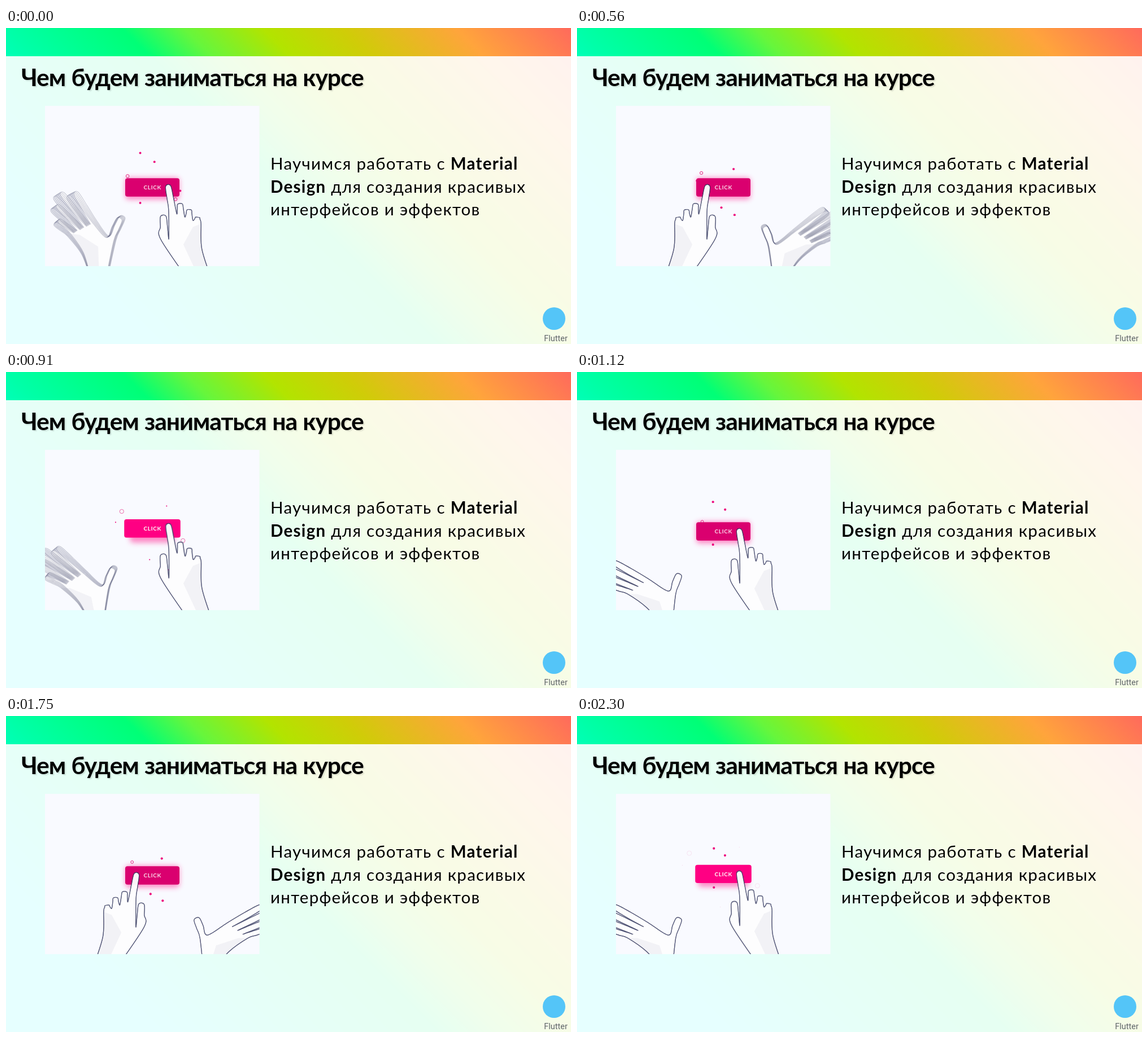
Animation, 1000 px wide and 560 px high, one loop 2370 ms. Source, as an HTML page:

```html
<!DOCTYPE html>
<html lang="ru">
<head>
<meta charset="utf-8">
<title>Чем будем заниматься на курсе</title>
<style>
  html, body { margin: 0; width: 100%; height: 100%; overflow: hidden; }
  svg { display: block; width: 100vw; height: 100vh; }
  text { font-family: Lato, "Open Sans", sans-serif; }
  .title { font-size: 42.5px; font-weight: 700; letter-spacing: -1px; word-spacing: 1px; text-shadow: 2px 2px 2px rgba(0,0,0,.12); }
  .body { font-size: 29.5px; letter-spacing: 1.3px; }
  .body tspan { font-weight: 700; }
  .label { font-size: 10px; font-weight: 700; letter-spacing: .7px; }
  .caption { font: 14.5px Roboto, Inter, sans-serif; fill: #606469; }
</style>
</head>
<body>
<svg viewBox="0 0 1000 560" preserveAspectRatio="none">
  <defs>
    <linearGradient id="rainbow" gradientUnits="userSpaceOnUse" x1="-280" y1="280" x2="500" y2="-500">
      <stop offset=".17" stop-color="#00ffff"/>
      <stop offset=".36" stop-color="#00ffa8"/>
      <stop offset=".49" stop-color="#00ff76"/>
      <stop offset=".56" stop-color="#66f63c"/>
      <stop offset=".65" stop-color="#b2e400"/>
      <stop offset=".74" stop-color="#d0cc08"/>
      <stop offset=".87" stop-color="#ffa43c"/>
      <stop offset="1" stop-color="#ff6a5c"/>
    </linearGradient>
    <clipPath id="panel"><rect x="69" y="138" width="379.5" height="284"/></clipPath>
    <filter id="soft" x="-30%" y="-80%" width="160%" height="260%"><feGaussianBlur stdDeviation="5"/></filter>
  </defs>
  <rect width="1000" height="560" fill="url(#rainbow)"/>
  <rect y="50" width="1000" height="510" fill="#fff" opacity=".9"/>
  <text class="title" x="27" y="103">Чем будем заниматься на курсе</text>
  <g class="body">
    <text x="468" y="250.5">Научимся работать с <tspan>Material</tspan></text>
    <text x="468" y="291.5"><tspan>Design</tspan> для создания красивых</text>
    <text x="468" y="332">интерфейсов и эффектов</text>
  </g>
  <circle cx="970" cy="515" r="20" fill="#54c5f8"/>
  <text class="caption" x="973" y="555" text-anchor="middle">Flutter</text>
  <g clip-path="url(#panel)">
    <rect x="69" y="138" width="380" height="284" fill="#f9faff"/>
    <rect id="shadow" rx="6" fill="#ff2f96" opacity=".55" filter="url(#soft)"/>
    <g id="sparks"></g>
    <rect id="button" rx="4"/>
    <text id="label" class="label" x="259.3" text-anchor="middle">CLICK</text>
    <g id="hands"></g>
  </g>
</svg>
<script>
const LOOP = 2370, STEP = 70, CYCLE = 18, HALF = CYCLE / 2, AXIS = 259, TRAIL = 6;
const $ = id => document.getElementById(id);
const mix = (a, b, k) => a + (b - a) * k;
const between = (p, q, k) => p.map((v, c) => mix(v, q[c], k));
const ease = (from, to, x) => {
  const k = Math.min(1, Math.max(0, (x - from) / (to - from)));
  return k * k * (3 - 2 * k);
};
const set = (el, attrs) => {
  for (const name in attrs) el.setAttribute(name, attrs[name]);
  return el;
};
const add = (parent, tag, attrs) =>
  parent.appendChild(set(document.createElementNS("http://www.w3.org/2000/svg", tag), attrs));

// Right-hand poses: wrist edges, thumb and knuckle line as points; fan in degrees from upright.
const OPEN = { wrist: [313, 357], thumb: [295, 366], thumbTip: [269, 320],
  first: [314, 332], last: [357, 345], fan: [-2, 28], reach: [70], fold: [1] };
const AWAY = { wrist: [349, 370], thumb: [350, 391], thumbTip: [336, 356],
  first: [396, 370], last: [424, 390], fan: [60, 72], reach: [78], fold: [1] };
const POINT = { wrist: [322, 364], thumb: [281, 374], thumbTip: [278, 330],
  first: [295, 326], last: [338, 344], fan: [-10, 8], reach: [58], fold: [.4] };
const FINGERS = [.86, 1, .8, .48];

function poseAt(step) {
  const s = (step + CYCLE) % CYCLE;
  const point = 1 - ease(2, 4, s) + ease(13, 15, s);
  const away = ease(3, 7, s) - ease(9, 13.2, s);
  const arc = away * (1 - away);
  const hover = ease(13, 15, s) - ease(15, 18, s);
  const pose = { shift: [20 * arc, -30 * arc - 9 * hover] };
  for (const part in OPEN) {
    pose[part] = OPEN[part].map((v, n) =>
      v + (POINT[part][n] - v) * point + (AWAY[part][n] - v) * away);
  }
  return pose;
}

function digit(base, tip, width) {
  const dx = tip[0] - base[0], dy = tip[1] - base[1], length = Math.hypot(dx, dy);
  const at = (side, far) => [
    base[0] + (dx * far - dy * side * width) / length,
    base[1] + (dy * far + dx * side * width) / length
  ];
  const end = length - width * .3;
  return [at(-.6, 0), at(-.52, length / 2), at(-.4, end), at(.4, end), at(.52, length / 2), at(.6, 0)];
}

function outline(step) {
  const { wrist, thumb, thumbTip, first, last, fan, reach, fold, shift } = poseAt(step);
  const knuckle = n => between(first, last, n / 3);
  const pts = [[wrist[0], 446], ...digit(thumb, thumbTip, 12), knuckle(-.5)];
  FINGERS.forEach((size, n) => {
    const angle = mix(fan[0], fan[1], n / 3) * Math.PI / 180;
    const length = reach[0] * size * (n ? fold[0] : 1);
    const [x, y] = knuckle(n);
    const tip = [x + length * Math.sin(angle), y - length * Math.cos(angle)];
    pts.push(...digit([x, y], tip, 11 - n * .7).slice(1, -1), knuckle(n + .5));
  });
  const heel = [wrist[1], 446];
  const [x, y] = between(knuckle(3.5), heel, .45);
  pts.push([x - 7, y], heel);
  return pts.map(p => [p[0] + shift[0], p[1] + shift[1]]);
}

function smooth(pts) {
  let d = "M" + pts[0];
  for (let n = 0; n < pts.length - 1; n++) {
    const a = pts[n], b = pts[n + 1];
    const before = pts[n - 1] || a, after = pts[n + 2] || b;
    const c1 = a.map((v, c) => v + (b[c] - before[c]) / 6);
    const c2 = b.map((v, c) => v - (after[c] - a[c]) / 6);
    d += `C${c1} ${c2} ${b}`;
  }
  return d;
}

function palmShade(pts) {
  const [wrist, thumb] = pts, [knuckle, side, heel] = pts.slice(-3);
  return "M" + [knuckle, side, heel, between(heel, wrist, .5),
    between(side, thumb, .45), between(knuckle, thumb, .2)].join("L") + "Z";
}

function makeHand(transform) {
  const g = add($("hands"), "g", { transform });
  const fill = (color, opacity) => add(g, "path", { fill: color, "fill-opacity": opacity });
  const ghost = fill("#e8eaf0", .7), skin = fill("#fff", .88), shade = fill("#f1f1f4", .8);
  const lines = Array.from({ length: TRAIL }, () => add(g, "path",
    { fill: "none", stroke: "#20284f", "stroke-width": 1.2, "stroke-opacity": .22, "stroke-linejoin": "round" }));
  return step => {
    const trail = lines.map((_, n) => outline(step - n * .05));
    const paths = trail.map(smooth);
    lines.forEach((line, n) => set(line, { d: paths[n] }));
    set(ghost, { d: paths[TRAIL - 1] });
    set(skin, { d: paths[0] });
    set(shade, { d: palmShade(trail[0]) });
  };
}
const rightHand = makeHand("");
const leftHand = makeHand(`matrix(-1 0 0 1 ${2 * AXIS} 0)`);

// Two bursts of sparks around the button centre; the first two of each are rings.
const BURSTS = [
  [[-47, -21], [44, 23], [-23, -65], [4, -48], [53, 7], [-23, 30]],
  [[-45, -29], [45, 14], [21, -37], [-4, 42], [23, 57], [-54, -13]]
];
const sparks = BURSTS.map(list => list.map(() => add($("sparks"), "circle", {})));

function drawSparks(step) {
  BURSTS.forEach((list, burst) => {
    const age = (step + 1 + burst * HALF) % CYCLE - 1;
    const spread = 1 + .068 * (age - 3);
    list.forEach(([dx, dy], n) => {
      const ring = n < 2;
      set(sparks[burst][n], {
        cx: AXIS + dx * spread, cy: 282 + dy * spread,
        r: ring ? 2.4 + .2 * age : 2.1 * Math.max(0, 1 - (age / 8.5) ** 2),
        fill: ring ? "none" : "#ee0a7e",
        stroke: ring ? "#e3207f" : "none",
        opacity: age > 8 ? (ring && age < 9 ? .2 : 0) : ring ? 1 - ease(4, 9, age) : 1
      });
    });
  });
}

function drawButton(step) {
  const s = step % HALF;
  const rise = ease(2, 4, s) - ease(7, 9, s);
  const glow = ease(2, 6, s) - ease(8, 9, s);
  const width = 96 + 3.5 * glow, height = 32.4;
  const x = AXIS - width / 2, y = 266.3 - 5.2 * rise;
  const inset = 10 * rise, grow = 3 - 7 * rise;
  set($("button"), { x, y, width, height, fill: `rgb(${mix(218, 255, glow)},0,${mix(111, 131, glow)})` });
  set($("shadow"), { x: x + inset, y: y + 2 + 11 * rise - grow,
    width: width - 2 * inset, height: height + 2 * grow });
  set($("label"), { y: y + height / 2 + 3.6, fill: glow < .3 ? "#fbd9ea" : "#fff" });
}

function draw() {
  const t = performance.now() % LOOP;
  const tick = Math.floor((t < 2230 ? t : t + 10) / STEP);
  const step = (tick + 2) % CYCLE;
  drawSparks(step);
  drawButton(step);
  rightHand(step);
  leftHand(step + HALF);
  requestAnimationFrame(draw);
}
draw();
</script>
</body>
</html>
```
